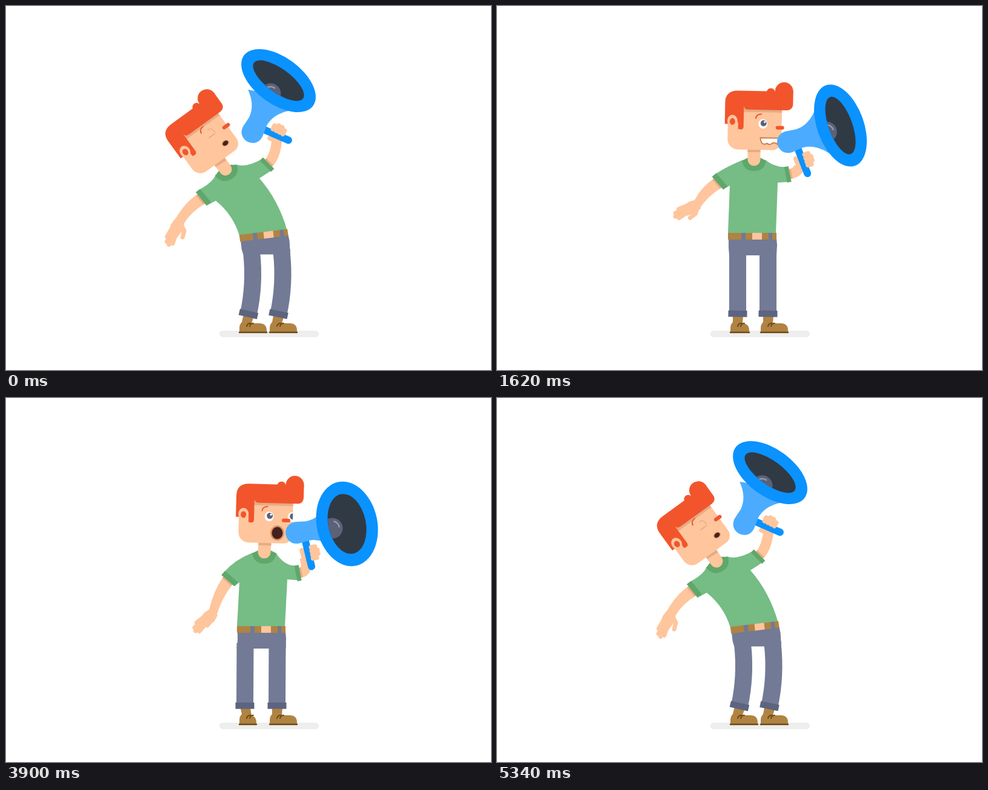
An HTML page with a canvas for the animation above (5.4 s loop, 800 by 600 pixels).

```html
<!DOCTYPE html>
<html>
<head>
<meta charset="utf-8">
<style>
html, body { margin: 0; width: 100%; height: 100%; overflow: hidden; background: #fff; }
canvas { display: block; width: 800px; height: 600px; }
</style>
</head>
<body>
<canvas id="stage" width="800" height="600"></canvas>
<script>
const ctx = document.getElementById('stage').getContext('2d');
const LOOP = 5400, STEP = 60;
const SKIN = '#ffc59c', SHADE = '#e5ac85', HAIR = '#f2552c', SHIRT = '#75bc85', TRIM = '#5fa76b',
  PANTS = '#727a95', CUFF = '#5d6480', LEATHER = '#b08342', SOLE = '#6a4a14',
  BLUE = '#0a92ff', LIGHT = '#4bacff', DARK = '#303a45', METAL = '#5c6178';

// head: x y angle turn | face: nose x y, eye opening | mouth: x y rx ry
// hip: x y angle bend legShift knee | feet: both ankles x y angle, left shoe length, ground half-width
// mega: bell x y, mouthpiece x y, tilt, bell depth, bell radius
const leanBack = {
  head: [352.5, 256.5, -36, 5], face: [43, -41, 0], kind: 'o', mouth: [25.5, -19, 5, 3.5],
  neck: [362, 269, -27], cuffL: [322, 318, 141], cuffR: [433, 259, -45],
  pits: [346, 321, 418, 284], shoulders: [342, 290, 396, 267],
  hip: [424.5, 372.5, -7, 10, 5.5, 4], feet: [400, 507.5, 13, 449.5, 507.5, 12, 45, 82],
  wrist: [286, 355, 113, -15], mega: [449.5, 123, 407, 207, -54, 38.7, 70.5]
};
const shout = {
  head: [426, 244, -3, 1], face: [28, -40, .42], kind: 'o', mouth: [18, -19, 9, 10],
  neck: [427, 258, -2], cuffL: [357, 294, 159], cuffR: [483, 280, -9],
  pits: [387, 298, 464, 295], shoulders: [395, 266, 458, 271],
  hip: [423.5, 376, -1.5, 2, 7, 5], feet: [402, 508, 17, 451, 507, 14, 45, 82],
  wrist: [315, 313, 171, -15], mega: [568.5, 204.5, 486, 229, -16, 47, 73]
};
const grin = {
  head: [424, 237, 1, 9], face: [42, -37, 1], kind: 'grin', mouth: [25, -15, 15, 5],
  neck: [424, 253, 0], cuffL: [364, 292, 139], cuffR: [483, 277, -11],
  pits: [384, 296, 463, 291], shoulders: [380, 264, 458, 266],
  hip: [421, 374, 0, 0, 1, 0], feet: [397, 507, 1, 447, 507, 1, 31, 82],
  wrist: [331, 327, 150, -13], mega: [566.5, 197, 481, 224, -20, 38.5, 70.5]
};
const smile = {
  head: [427, 237, 0, 5], face: [31, -39, 1], kind: 'smile', mouth: [19, -15, 15, 7],
  neck: [426, 252, 0], cuffL: [366, 298, 131], cuffR: [487, 287, -11],
  pits: [385, 303, 464, 299], shoulders: [378, 262, 457, 275],
  hip: [421, 373, 0, 0, 1, 0], feet: [393, 507, -1, 448, 507, 0, 28, 82],
  wrist: [338, 346, 115, -14], mega: [565, 197.5, 482, 219, -16, 47, 70.5]
};
const alarm = {
  head: [427, 239, 1.5, 8], face: [34, -38, 1], kind: 'o', mouth: [20, -17, 9, 10],
  neck: [426, 254, 0], cuffL: [366, 301, 131], cuffR: [485, 288, -11],
  pits: [385, 304, 464, 299], shoulders: [378, 266, 459, 277],
  hip: [421, 376, 0, 0, 0, 0], feet: [394, 507, 0, 447, 507, 0, 28, 82],
  wrist: [342, 354, 133, -7], mega: [562.5, 207.5, 480, 222, -12, 50, 70.5]
};
const sway = {
  head: [391, 254, -17, 0], face: [34, -42, .55], kind: 'o', mouth: [20, -20, 7, 4.5],
  neck: [394, 269, -15], cuffL: [347, 315, 134], cuffR: [466, 274, -27],
  pits: [367, 317, 445, 294], shoulders: [362, 288, 428, 274],
  hip: [429, 382, -5, 8, 9, 8], feet: [404, 510, 25, 454, 509, 24, 45, 86],
  wrist: [323, 360, 98, -14], mega: [511, 152.5, 445, 216, -38, 42.7, 70.5]
};

function nudge(pose, deltas) {
  const out = { ...pose };
  for (const k in deltas) out[k] = pose[k].map((v, i) => v + (deltas[k][i] || 0));
  return out;
}

const KEYS = [
  [0, leanBack],
  [600, shout],
  [1260, nudge(shout, { wrist: [6, 3, -5], mega: [8, 0, 5, 0], head: [3, 0, 1, 1] })],
  [1620, grin],
  [2100, nudge(smile, { head: [0, -8], neck: [0, -5], wrist: [-12, -8, 10], mega: [-4, -7, -3, -6] })],
  [2700, nudge(alarm, { head: [3, 1], wrist: [-8, -8, 6], mega: [10, -5, 5, -3] })],
  [3120, smile],
  [3360, nudge(smile, { head: [0, -4], neck: [0, -3], mega: [1, -3, 1, -3] })],
  [3900, alarm],
  [4260, nudge(alarm, { wrist: [-7, -4, 2], mega: [0, -6, 0, -3] })],
  [4500, nudge(alarm, { wrist: [-5, -1], head: [0, 2, -3], mega: [10, -8, 4, -2], feet: [3, 0, 8, 2, 0, 8, 5, 1], hip: [2, 1, -1, 2, 3, 3] })],
  [4860, sway],
  [5340, nudge(leanBack, { head: [1], wrist: [1], mega: [1, 0, 1] })],
  [LOOP, leanBack]
];
const BURSTS = [[480, 1320], [2580, 2880], [4320, 4620]];

function poseAt(t) {
  const i = KEYS.findIndex((k, n) => t >= k[0] && t < KEYS[n + 1][0]);
  const [t0, a] = KEYS[i], [t1, b] = KEYS[i + 1];
  const u = (t - t0) / (t1 - t0), e = u * u * (3 - 2 * u), pose = {};
  for (const k in a) {
    pose[k] = k === 'kind' ? (u < .5 ? a : b)[k] : a[k].map((v, n) => v + (b[k][n] - v) * e);
  }
  return pose;
}

const rad = d => d * Math.PI / 180;
// Point in a frame at (x, y) turned by deg
function local(x, y, deg, px, py) {
  const c = Math.cos(rad(deg)), s = Math.sin(rad(deg));
  return [x + px * c - py * s, y + px * s + py * c];
}
function within(x, y, deg, draw) {
  ctx.save(); ctx.translate(x, y); ctx.rotate(rad(deg)); draw(); ctx.restore();
}
// Path steps: 2 numbers line, 4 quadratic, 6 cubic
function trace(first, ...steps) {
  ctx.beginPath();
  ctx.moveTo(...first);
  for (const s of steps) {
    if (s.length === 2) ctx.lineTo(...s);
    else if (s.length === 4) ctx.quadraticCurveTo(...s);
    else ctx.bezierCurveTo(...s);
  }
}
function fill(color, ...path) { trace(...path); ctx.closePath(); ctx.fillStyle = color; ctx.fill(); }
function line(color, width, cap, ...path) {
  trace(...path);
  ctx.strokeStyle = color; ctx.lineWidth = width; ctx.lineCap = cap; ctx.lineJoin = 'round';
  ctx.stroke();
}
function oval(color, x, y, rx, ry = rx) {
  ctx.beginPath(); ctx.ellipse(x, y, rx, ry, 0, 0, 7); ctx.fillStyle = color; ctx.fill();
}
function box(color, x, y, w, h, r = 0) {
  ctx.beginPath(); ctx.roundRect(x, y, w, h, r); ctx.fillStyle = color; ctx.fill();
}

function shoe(x, width, ankle) {
  fill(LEATHER, [ankle - 8, 508], [ankle + 9, 511], [x + 20, 523], [x + width - 12, 523],
    [x + width, 523, x + width, 535], [x + width, 537], [x, 537], [x, 531], [x, 525, x + 4, 521]);
  line(SOLE, 2.5, 'round', [x, 538], [x + width, 538]);
  for (const dx of [0, 5]) line(SOLE, 2, 'round', [x + 12 + dx, 528], [x + 13 + dx, 523, x + 18 + dx, 523]);
}

function legs({ hip, feet }) {
  const [hx, hy, angle, , shift, knee] = hip;
  const [lx, ly, la, rx, ry, ra, width] = feet;
  const gap = (rx - lx) / 2, mid = hx + shift, top = hy + 37;
  shoe(385, width, lx);
  shoe(435, 45, rx);
  for (const [x, y, a, tx] of [[lx, ly, la, mid - gap], [rx, ry, ra, mid + gap]]) {
    line(PANTS, 28, 'butt', [tx, top - 9], [tx, top - 2], [(tx + x) / 2 + knee * 2, (top + y) / 2, x, y]);
    within(x, y, a, () => box(CUFF, -15.5, -5, 31, 10.5));
  }
  fill(PANTS, local(hx, hy, angle, -39, 9), local(hx, hy, angle, 40, 9), local(hx, hy, angle, 41, 20),
    [mid + gap + 14, top], [mid - gap - 14, top], local(hx, hy, angle, -39, 24));
}

function belt({ hip }) {
  within(hip[0], hip[1], hip[2], () => {
    box(LEATHER, -40, 0, 80, 11);
    box(PANTS, -18, 0, 7, 11);
    box(SKIN, 0, 0, 16, 11);
    box(PANTS, 27, 0, 6, 11);
  });
}

function leftArm({ cuffL, wrist }) {
  const [sx, sy, sa] = cuffL, [x, y, a, thumb] = wrist;
  const from = (p, q) => local(sx, sy, sa, p, q), to = (p, q) => local(x, y, a, p, q);
  const cx = (sx + x) / 2 - 5, cy = (sy + y) / 2 - 4;
  const n = [(from(0, 9)[0] - sx), (from(0, 9)[1] - sy)];
  fill(SKIN, from(-8, 10), from(0, 10), [cx + n[0], cy + n[1], ...to(2, 8)], to(2, -8),
    [cx - n[0], cy - n[1], ...from(0, -10)], from(-8, -10));
  line(SHADE, 4, 'butt', from(1, 9.5), from(1, -9.5));
  within(x, y, a, () => {
    fill(SKIN, [-2, -8], [10, -11], [26, -7], [28, 9], [10, 11], [-2, 8]);
    for (const [fx, fy] of [[31, 9], [39, 6], [42, 1], [38, -4]]) line(SKIN, 7, 'round', [12, fy * .7], [fx, fy]);
    line(SKIN, 7, 'round', [5, -6], [11, thumb * .9], [22, thumb]);
  });
}

function shirt({ neck, cuffL, cuffR, pits, shoulders, hip }) {
  const [nx, ny, na] = neck, bend = hip[3];
  const h = (p, q) => local(hip[0], hip[1], hip[2], p, q);
  const l = (p, q) => local(...cuffL, p, q), r = (p, q) => local(...cuffR, p, q);
  const side = (ax, ay, [bx, by]) => [(ax + bx) / 2 + bend * .9, (ay + by) / 2 - bend * .6];
  const [ax, ay, bx, by] = pits, hl = h(-40, 1), hr = h(39, 1);
  fill(SHIRT, local(nx, ny, na, -19, 1), [shoulders[0], shoulders[1], ...l(-6, 14)], l(0, 14), l(0, -14), [ax, ay],
    [...side(ax, ay, hl), ...hl], hr, [...side(bx, by, hr), bx, by],
    r(0, 13), r(0, -13), r(-5, -13), [shoulders[2], shoulders[3], ...local(nx, ny, na, 19, 1)]);
  fill(TRIM, l(0, 14), l(0, -14), l(-9, -14), l(-9, 14));
}

function neckAndCollar({ neck, head }) {
  const [x, y, a] = neck;
  within(x, y, a, () => fill(TRIM, [-20, 2], [-10, -3], [10, -3], [20, 2], [17, 19, 0, 19], [-17, 19, -20, 2]));
  line(SKIN, 21, 'round', [head[0], head[1]], [x, y]);
  within(head[0], head[1], (head[2] + a) / 2, () => box(SHADE, -10.5, -4, 21, 8));
}

function eye(x, y, open) {
  const closed = open < .15, lid = y - 8 + 16 * (1 - open);
  ctx.save();
  ctx.beginPath(); ctx.rect(x - 10, lid, 20, 30); ctx.clip();
  oval('#fff', x, y, 7.5, 8);
  oval(METAL, x + 1, y - 1 + (1 - open) * 3, 5);
  oval('#fff', x + 3, y - 3, 1.7);
  ctx.restore();
  if (open < .9) {
    const w = closed ? 6 : 7.5, ly = closed ? y + 5 : lid;
    line(SHADE, 1.6, 'round', [x - w, ly], [x + w, ly]);
    if (closed) line(SHADE, 1.4, 'round', [x, y - 7], [x + 8, y - 7, x + 7, y + 3]);
  }
}

function mouth(kind, [x, y, rx, ry]) {
  ctx.save();
  ctx.translate(x, y);
  if (kind === 'o') {
    const lip = rx * .27;
    oval('#d59668', 0, 0, rx + lip, ry + lip);
    oval('#46201c', 0, 0, rx, ry);
  } else {
    const lower = kind === 'smile'
      ? [[rx, ry, 3, ry], [-rx * .8, ry, -rx, -ry]]
      : [[rx - 2, ry], [7, ry - 4, 3, ry], [0, ry + 2, -4, ry - 1], [-8, ry + 2, -12, ry - 1], [-rx, 0, -rx, -ry]];
    const path = [[-rx, -ry], [rx, -ry], ...lower];
    fill('#fff', ...path);
    line('#cb8250', 2, 'round', ...path, [-rx, -ry]);
  }
  ctx.restore();
}

function drawHead({ head, face, kind, mouth: m }) {
  const [x, y, angle, turn] = head, [nx, ny, open] = face;
  within(x, y, angle, () => {
    const ex = nx - 28, ey = ny - 6;
    ctx.save();
    ctx.beginPath(); ctx.roundRect(-44, -85, 89, 85, [0, 0, 15, 17]);
    ctx.fillStyle = SKIN; ctx.fill(); ctx.clip();
    box(SHADE, -30, -68, 80, 6);
    eye(ex, ey, open);
    eye(ex + 38, ey, open);
    mouth(kind, m);
    ctx.restore();
    line(HAIR, 2, 'round', [ex - 12, ey - 9], [ex - 11, ey - 16, ex - 3, ey - 16]);
    line(HAIR, 6, 'round', [nx - 4, ny], [nx + 4, ny]);

    const tip = 54 + turn, burn = -27 + turn;
    fill(HAIR, [-49, -42], [-49, -77], [-49, -97, -28, -97], [tip - 28, -97], [tip, -97], [tip, -77],
      [tip, -66, tip - 11, -66], [burn + 8, -66], [burn, -66, burn, -72], [burn, -38],
      [burn, -33, burn - 5, -33], [burn - 9, -34], [burn - 9, -45], [-43, -42]);
    oval(HAIR, tip - 15, -97, 15);
    oval(HAIR, tip - 37, -95, 7);
    oval(SKIN, -36.5, -47, 8.5, 10);
    oval(HAIR, -36.5, -46, 4.5, 5.5);
  });
}

function megaphone({ mega, cuffR }, t) {
  const [cx, cy, mx, my, tilt, depth, radius] = mega;
  const axis = Math.atan2(cy - my, cx - mx) * 180 / Math.PI;
  const grip = local(mx, my, axis, 5, 42), elbow = local(...cuffR, 16, 0);
  line(SKIN, 17, 'butt', local(...cuffR, -5, 0), [cuffR[0], cuffR[1]], [...elbow, ...grip]);
  line(SHADE, 4, 'butt', local(...cuffR, 1, 8), local(...cuffR, 1, -8));

  within(mx, my, axis, () => {
    line(SHADE, 9, 'round', [7, 44], [8, 36]);
    line(SKIN, 8, 'round', [4, 44], [3, 30]);
    line(BLUE, 12, 'round', [11, 12], [14, 59]);
    for (let i = 0; i < 4; i++) line(SKIN, 8, 'round', [19, 28 + i * 6], [i % 3 ? 28 : 25, 28 + i * 6]);
    fill(LIGHT, [0, -18], [18, -16], [40, -16, 58, -38], [70, 0], [58, 38], [40, 16, 18, 16], [0, 18],
      [-25, 18, -25, -18, 0, -18]);
  });

  within(cx, cy, tilt, () => {
    oval(BLUE, 0, 0, depth, radius);
    ctx.save();
    oval(DARK, 0, 0, depth - 19, radius - 20.5);
    ctx.clip();
    oval(METAL, -25, 2, 17);
    ctx.beginPath(); ctx.arc(-25, 2, 11.5, -1.2, .1);
    ctx.strokeStyle = '#9599aa'; ctx.lineWidth = 2.5; ctx.stroke();
    ctx.restore();
    rays(t);
  });
}

function rays(t) {
  const burst = BURSTS.find(([a, b]) => t >= a && t < b);
  if (!burst) return;
  const p = (t - burst[0]) % 240 / 240;
  const tail = Math.max(0, p * 2 - 1);
  for (const [x, y, a, len] of [[-9, -25, -21, 42], [1, 2, 3, 94], [-10, 27, 24, 42]]) {
    within(x, y, a, () => { if (p) line('#fff', 5, 'round', [tail * len, 0], [p * len, 0]); });
  }
}

// Hem lies in front of the raised arm
function rightHem({ cuffR }) {
  const r = (p, q) => local(...cuffR, p, q);
  fill(TRIM, r(0, 13), r(0, -13), r(-7, -13), r(-7, 13));
}

function render(t) {
  const pose = poseAt(t), ground = pose.feet[7];
  ctx.fillStyle = '#fff';
  ctx.fillRect(0, 0, 800, 600);
  box('#eee', 434 - ground, 535, ground * 2, 11, 5.5);
  legs(pose);
  leftArm(pose);
  shirt(pose);
  belt(pose);
  neckAndCollar(pose);
  drawHead(pose);
  megaphone(pose, t);
  rightHem(pose);
}

const start = performance.now();
function tick() {
  const t = (performance.now() - start) % LOOP;
  render(Math.floor(t / STEP) * STEP);
  requestAnimationFrame(tick);
}
tick();
</script>
</body>
</html>
```
